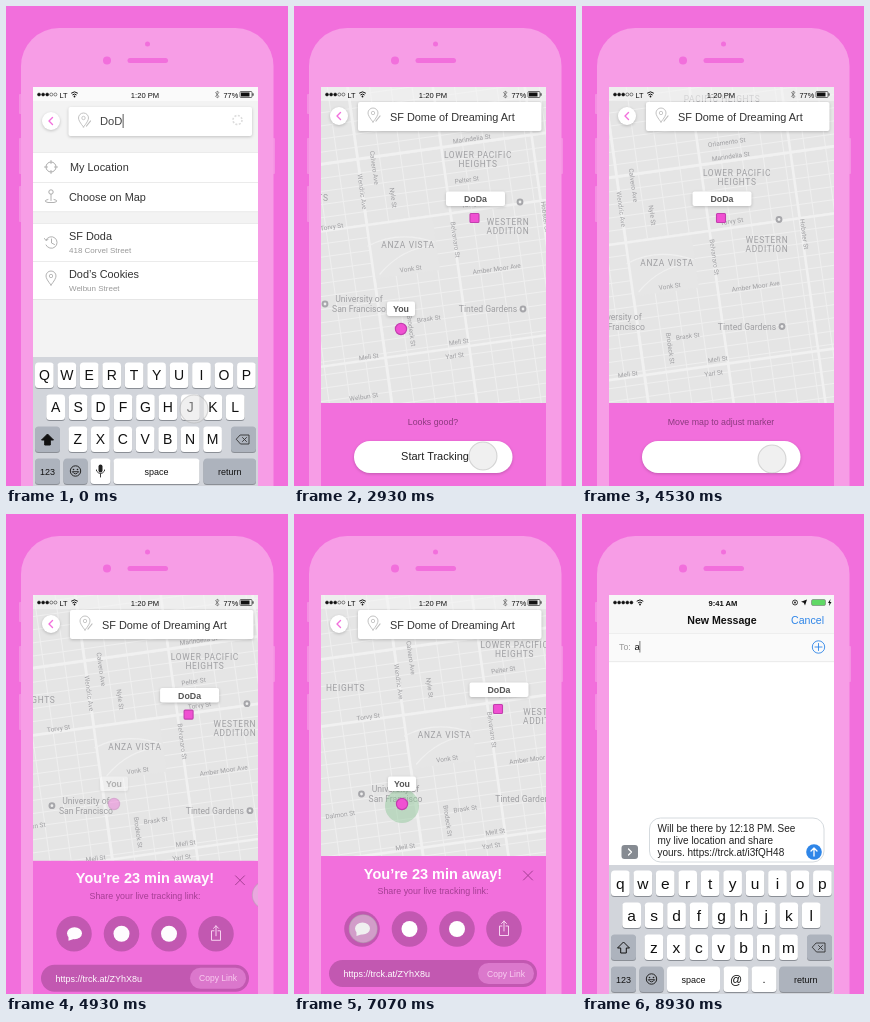
Recreate the animation shown at these times as an HTML page. Size 282 by 480 pixels, loop 9070 ms.

```html
<!DOCTYPE html>
<html lang="en">
<head>
<meta charset="utf-8">
<title>Share your trip</title>
<style>
  html, body { margin: 0; height: 100%; overflow: hidden; background: #f26fdc; }
  svg { display: block; width: 100vw; height: 100vh; }
  text { font-family: "Liberation Sans", Arial, sans-serif; white-space: pre; }
  .mid { text-anchor: middle; }
  .bold { font-weight: 700; }
  .map text { font-family: Roboto, sans-serif; text-anchor: middle; fill: #9f9fa2; }
  .line { fill: none; stroke-linecap: round; stroke-linejoin: round; }
  .card { fill: #fff; filter: drop-shadow(0 1px 1.5px rgba(0, 0, 0, .2)); }
</style>
</head>
<body>
<svg id="stage" viewBox="0 0 282 480" preserveAspectRatio="none"></svg>
<script>
const PINK = '#f26fdc', BLUE = '#2f86e8', PLACE = 'SF Dome of Dreaming Art', LOOP = 9070;

const text = (s, x, y, size, fill = '#333', attrs = '') =>
  `<text x="${x}" y="${y}" font-size="${size}" fill="${fill}" ${attrs}>${s}</text>`;
const mid = (s, x, y, size, fill, cls = '', attrs = '') => text(s, x, y, size, fill, `class="mid ${cls}" ${attrs}`);
const rect = (x, y, w, h, fill, r = 0, attrs = '') =>
  `<rect x="${x}" y="${y}" width="${w}" height="${h}" rx="${r}" fill="${fill}" ${attrs}/>`;
const dot = (x, y, r, fill, attrs = '') => `<circle cx="${x}" cy="${y}" r="${r}" fill="${fill}" ${attrs}/>`;
const line = (d, stroke, w = 1, attrs = '') => `<path class="line" d="${d}" stroke="${stroke}" stroke-width="${w}" ${attrs}/>`;
const group = (id, body, attrs = '') => `<g id="${id}" ${attrs}>${body}</g>`;

function statusBar(chat) {
  let s = '';
  for (let i = 0; i < 5; i++)
    s += dot(33 + i * 4.1, 88.5, 1.5, chat || i < 3 ? '#111' : 'none', 'stroke="#111" stroke-width=".5"');
  const wx = chat ? 58 : 68.5;
  s += line(`M${wx - 3} 87q3-2.6 6 0M${wx - 1.8} 88.7q1.8-1.6 3.6 0`, '#111', 1) + dot(wx, 90.5, .9, '#111');
  s += mid(chat ? '9:41 AM' : '1:20 PM', chat ? 141 : 139, 91.5, 7.6, '#111', chat ? 'bold' : '');
  if (chat)
    return s + dot(213, 88.5, 2.5, 'none', 'stroke="#111" stroke-width=".8"') + dot(213, 88.5, .9, '#111') +
      '<path d="M225 85.5l-2 6-1.2-2.8-2.8-1z" fill="#111"/>' +
      rect(229.5, 85.5, 14, 6, '#5fd864', 1.5, 'stroke="#777" stroke-width=".6"') +
      '<path d="M248.5 85l-2.5 4h1.5l-.5 3 2.5-4h-1.5z" fill="#111"/>';
  return s + text('LT', 53.5, 91.5, 7.4, '#111') + line('M209.5 86.5l3.5 4-2 1.5v-7l2 1.5-3.5 4', '#555', .6) +
    text('77%', 217.5, 91.5, 7.4, '#111') +
    rect(234, 85.5, 12, 6, 'none', 1, 'stroke="#111" stroke-width=".6"') +
    rect(235, 86.5, 8.5, 4, '#111') + rect(246.5, 87.3, 1, 2.4, '#111');
}

function keyboard(chat) {
  const key = (x, y, w, label, size, dark, id = '') =>
    rect(x, y + 1, w, 25.5, '#8b8f96', 3.5) +
    rect(x, y, w, 25.5, dark ? '#adb3bd' : '#fff', 3.5, id && `id="${id}"`) +
    mid(label, x + w / 2, y + 13 + size * .35, size, '#111');
  let s = rect(27, 351, 225, 129, '#d2d5db');
  [['QWERTYUIOP', 29, 356.5], ['ASDFGHJKL', 40.3, 388.5], ['ZXCVBNM', 62.5, 420.5]].forEach(([row, x, y]) => {
    [...row].forEach((c, i) => s += key(x + i * 22.45, y, 18.7, chat ? c.toLowerCase() : c,
      chat ? 15.5 : 14, 0, chat && c === 'A' ? 'keyA' : ''));
  });
  s += key(29, 420.5, 25, '', 9, 1) + key(225, 420.5, 25, '', 9, 1);
  s += `<path d="M41.5 428l6 6h-3.2v5h-5.6v-5h-3.2z" fill="${chat ? 'none' : '#111'}" stroke="#111"/>`;
  s += line('M234.5 429h8.5v9h-8.5l-4-4.5zM236.5 431.5l4 4m0-4l-4 4', '#333', .9);
  s += key(29, 452.5, 25, '123', 9, 1) + key(57.5, 452.5, 24, '', 9, 1);
  s += dot(69.5, 465, 5.2, 'none', 'stroke="#222"') + dot(67.5, 463.5, .8, '#222') + dot(71.5, 463.5, .8, '#222') +
    line('M66.5 466q3 4 6 0z', '#222', .9);
  if (chat) s += key(85, 452.5, 53, 'space', 9) + key(141.5, 452.5, 25, '@', 12) + key(169.5, 452.5, 25, '.', 11);
  else s += key(84.5, 452.5, 20, '', 9) + rect(92.5, 458.5, 4, 8, '#222', 2) +
    line('M90.5 464v1q4 5 8 0v-1M94.5 468v3', '#222', .9) + key(107.5, 452.5, 86, 'space', 9);
  return s + key(197.5, 452.5, 52.5, 'return', 9, 1);
}

const pin = (x, y, c = '#aaa') =>
  line(`M${x} ${y + 7}q-5-6-5-9a5 5 0 0 1 10 0q0 3-5 9z`, c, .9) + dot(x, y - 2, 1.7, 'none', `stroke="${c}" stroke-width=".8"`);

const searchBar = (x, y, label) =>
  dot(45, y + 14, 9, '#fff', 'class="card"') + line(`M46.5 ${y + 10.5}l-3.5 3.5 3.5 3.5`, PINK, 1.4) +
  rect(x, y, 183.5, 29, '#fff', 2, 'class="card"') + pin(x + 15, y + 13, '#bbb') +
  line(`M${x + 18} ${y + 19}l4-5`, '#bbb', 1.2) + label;

function searchScreen() {
  const rule = y => rect(27, y, 225, .6, '#dedede');
  return rect(27, 81, 225, 399, '#f3f3f3') + rect(27, 81, 225, 14, '#fafafa') + statusBar() +
    searchBar(62.5, 101, text('DoD', 94, 119, 11.2, '#444') + rect(116.7, 108, .8, 14, '#333')) +
    group('spinner', dot(231.5, 114, 4.5, 'none', 'stroke="#ddd" stroke-width="1.6" stroke-dasharray="2 1.5"')) +
    rect(27, 146, 225, 60, '#fff') + rect(27, 217, 225, 76, '#fff') +
    rect(27, 217, 225, 38, '#ececec', 0, 'id="rowTap"') +
    [146, 176, 205.5, 217, 255, 293].map(rule).join('') +
    dot(45, 161, 5, 'none', 'stroke="#aaa"') + line('M45 154.5v3m0 7v3m-6.5-6.5h3m7 0h3', '#aaa', .9) +
    dot(45, 186, 2.2, 'none', 'stroke="#aaa"') + line('M45 188.5v6m-3-1q-6 1.5 0 3h6q6-1.5 0-3', '#aaa', .9) +
    line('M40 234a5.8 5.8 0 1 1 0 5m-1.5-6.5l1.5 2 2-1M45.5 233v4l3 1.5', '#aaa', .9) + pin(45, 272) +
    text('My Location', 64, 164.5, 10.9) + text('Choose on Map', 63, 194.5, 10.9) +
    text('SF Doda', 63, 234, 10.9) + text('418 Corvel Street', 63, 246.5, 8, '#999') +
    text('Dod’s Cookies', 63, 271.5, 10.9) + text('Welbun Street', 63, 284.5, 8, '#999') + keyboard();
}

// Each label: words, x, y, tilt in degrees
const areas = [['PACIFIC HEIGHTS', 169, 78.5], ['LOWER PACIFIC', 184, 152], ['HEIGHTS', 184, 161], ['ANZA VISTA', 114, 242],
  ['WESTERN', 214, 219], ['ADDITION', 214, 228], ['HEIGHTS', 15, 195]];
const places = [['University of', 65, 296], ['San Francisco', 65, 306], ['Tinted Gardens', 194, 306]];
const streets = [['Orlamento St', 174, 121], ['Marindelia St', 178, 135], ['Pelter St', 173, 176], ['Torvy St', 38, 223],
  ['Torvy St', 179, 200], ['Vonk St', 117, 265], ['Amber Moor Ave', 203, 265], ['Brask St', 135, 315], ['Dalmon St', 10, 321],
  ['Mell St', 75, 353], ['Mell St', 165, 338], ['Yarl St', 161, 352], ['Welbun St', 70, 393],
  ['Belvanaro St', 159, 234, 82], ['Wendric Ave', 66, 186, 82], ['Calvero Ave', 78, 162, 82], ['Nyle St', 97, 192, 82],
  ['Hobster St', 249, 211, 82], ['Brodeck St', 115, 325, 82]];

function cityMap() {
  const tilt = (s, x, y, a = -8) => text(s, x, y, 6.5, '', `transform="rotate(${a} ${x} ${y})"`);
  const major = (x, y) => `M${x - 300} ${y + 42}l600-84`;
  const cross = (x, y) => `M${x - 42} ${y - 300}l84 600`;
  return rect(-80, 20, 450, 470, 'url(#blocks)') +
    '<path d="M72 218l66-9 8 55-66 9z" fill="#e6e6e6"/>' +
    line(major(38, 224) + major(75, 354) + major(178, 137) + cross(160, 232) + cross(68, 185) + cross(249, 211), '#f1f1f1', 2.6) +
    line('M74 240q30-16 66-4M86 268q22-26 52-28', '#f0f0f0', 1.2) +
    streets.map(s => tilt(...s)).join('') +
    areas.map(([s, x, y]) => text(s, x, y, 8.4, '', 'letter-spacing=".65"')).join('') +
    places.map(([s, x, y]) => text(s, x, y, 8.6)).join('') +
    [[226, 196], [229, 303], [31, 298]].map(([x, y]) => dot(x, y, 3.4, '#a6a6aa') + dot(x, y, 1.4, '#eee')).join('');
}

const tag = (s, w) => rect(-w / 2, -7.5, w, 14.5, '#fff', 2, 'class="card"') + mid(s, 0, 3.2, 8.8, '#555', 'bold');

function sharePanel() {
  const disk = [68, 115.5, 163, 210].map(x => dot(x, 415, 17.8, '#c258b1')).join('');
  const dark = '#a43f93';
  return mid('You’re 23 min away!', 139, 364.5, 14.5, '#fff', 'bold') +
    mid('Share your live tracking link:', 139, 380, 8.9, dark) + line('M229.5 357l9 9m0-9l-9 9', dark) + disk +
    '<ellipse cx="68.5" cy="414.5" rx="7.5" ry="6" fill="#fff"/><path d="M62.5 416l0 6 6-2z" fill="#fff"/>' +
    dot(115.5, 415, 8, '#fff') + dot(163, 415, 8, '#fff') +
    line('M208 412h-2.5v9.5h9v-9.500h-2.5M210 417v-10m-2.5 2.500l2.5-2.500 2.5 2.500', '#f8d3f1', 1) +
    rect(35, 446, 208, 27, '#c258b1', 13.5) + text('https://trck.at/ZYhX8u', 49.5, 463, 9, '#fff') +
    rect(184, 449, 56, 21, '#db78cc', 10.5) + mid('Copy Link', 212, 462.5, 8.5, '#f9cdf1');
}

const mapScreen = () =>
  group('city', cityMap(), 'class="map"') +
  group('you', dot(0, 2, 16, '#8fc79a', 'id="pulse"') +
    group('youDot', dot(0, 0, 5.6, '#f050d2', 'stroke="#c23fae" stroke-width="1.2"')) +
    `<g transform="translate(0 -20)">${tag('You', 28)}</g>`) +
  group('goal', rect(-4.5, -4.5, 9, 9, '#f050d2', 1, 'stroke="#c23fae" stroke-width="1.1"') +
    `<g transform="translate(1 -19)">${tag('DoDa', 59)}</g>`) +
  rect(27, 81, 225, 14, '#f6f6f6', 0, 'opacity=".6"') + statusBar() +
  searchBar(64, 96, text(PLACE, 96, 115, 10.9)) +
  rect(27, 397, 225, 140, PINK, 0, 'id="sheet"') +
  group('ask', mid('Looks good?', 139, 419, 8.8, '#8c3a7f', '', 'id="askStart"') +
    mid('Move map to adjust marker', 139, 419, 8.8, '#8c3a7f', '', 'id="askMove"') +
    rect(60, 435, 158.5, 32, '#fff', 16, 'class="card"') + mid('Start Tracking', 141, 454, 11, '#222', '', 'id="go"')) +
  group('share', sharePanel());

const chatScreen = () =>
  rect(27, 81, 225, 399, '#fff') + rect(27, 81, 225, 38, '#f7f7f7') + rect(27, 119, 225, .6, '#d4d4d6') +
  rect(27, 119.6, 225, 28, '#fafafa') + rect(27, 147.5, 225, .6, '#ddd') + statusBar(true) +
  mid('New Message', 140, 110, 10.6, '#111', 'bold') + text('Cancel', 242, 110, 10.6, BLUE, 'text-anchor="end"') +
  text('To:', 37, 136, 8.8, '#999') + text('a', 52.5, 136, 9.5, '#111', 'id="typed"') +
  rect(52, 127, .8, 11.5, '#555', 0, 'id="caret"') +
  dot(236.5, 133, 6.2, 'none', `stroke="${BLUE}" stroke-width=".9"`) + line('M236.5 129.5v7m-3.5-3.5h7', BLUE, .9) +
  rect(67.5, 304, 174.5, 44, '#fff', 11, 'stroke="#d5dade"') +
  ['Will be there by 12:18 PM. See', 'my live location and share', 'yours. https://trck.at/i3fQH48']
    .map((s, i) => text(s, 75.5, 317.8 + i * 12, 10, '#222')).join('') +
  dot(232, 338, 7.8, BLUE) + line('M232 342v-8m-3 3l3-3 3 3', '#fff', 1.3) +
  rect(39.5, 331, 16.5, 14, '#868b92', 3) + line('M46.5 335l3 3-3 3', '#fff', 1.2) + keyboard(true);

stage.innerHTML = `<defs>
  <clipPath id="screen"><rect x="27" y="81" width="225" height="399"/></clipPath>
  <pattern id="blocks" width="21" height="13" patternUnits="userSpaceOnUse" patternTransform="translate(160 232) rotate(-8)">
    ${rect(0, 0, 21, 13, '#e5e5e5')}${line('M0 0H21M0 0V13', '#efefef', 2)}</pattern>
</defs>` + rect(0, 0, 282, 480, PINK) +
  [[13, 88, 20], [13, 132, 36], [13, 180, 36], [266, 132, 36]].map(([x, y, h]) => rect(x, y, 3, h, '#f48fe2', 1)).join('') +
  rect(15, 22, 252.5, 520, '#f79de6', 38) +
  dot(141.5, 38, 2.5, PINK) + dot(101, 54.5, 4, PINK) + rect(121.5, 52, 40.5, 5, PINK, 2.5) +
  `<g clip-path="url(#screen)">${group('map', mapScreen())}${group('search', searchScreen())}${group('chat', chatScreen())}` +
  group('touch', dot(0, 0, 14, '#e2e2e2', 'fill-opacity=".5" stroke="#aaa" stroke-opacity=".45" stroke-width="1.1"')) + '</g>';

const $ = id => document.getElementById(id);
const ease = (t, a, b) => { const p = Math.min(1, Math.max(0, (t - a) / (b - a))); return p * p * (3 - 2 * p); };

// Eased value of each column between rows of [time, ...values]
function along(t, keys) {
  let i = 0;
  while (i < keys.length - 2 && t >= keys[i + 1][0]) i++;
  const [a, b] = [keys[i], keys[i + 1]], p = ease(t, a[0], b[0]);
  return a.slice(1).map((v, n) => v + (b[n + 1] - v) * p);
}
const move = (id, [x, y]) => $(id).setAttribute('transform', `translate(${x} ${y})`);
const alpha = (id, v) => $(id).setAttribute('opacity', v);

const cityPath = [[1270, 8, 4], [1450, 2, 1], [2130, 0, 0], [3400, 0, 0], [3750, -41, 0], [3850, -41, 0],
  [4150, -29, 17.5], [4580, -29, 17.5], [5150, 36.5, -18]];
const goalPath = [[3400, 180.5, 212], [3750, 139, 212], [4580, 139, 212], [5150, 204, 195]];
const youPath = [[1300, 6, 8], [1500, 6, 8], [1900, 0, 0]];
const touchPath = [[0, 188, 403], [700, 195, 245], [2200, 195, 245], [2850, 189, 450], [3550, 189, 450], [3820, 160, 242],
  [3850, 160, 242], [4150, 172, 259], [4420, 190, 453], [4600, 190, 453], [5050, 275, 366], [6450, 275, 366], [7100, 68, 415]];

function draw(t) {
  $('spinner').setAttribute('transform', `rotate(${Math.min(t, 1130) * .36} 231.5 114)`);
  alpha('rowTap', ease(t, 900, 1100));
  alpha('search', 1 - ease(t, 1250, 1420));

  move('city', along(t, cityPath));
  move('goal', along(t, goalPath));

  const enRoute = t > 4500;
  move('you', enRoute ? [108, 290] : [107, 323]);
  alpha('you', enRoute ? ease(t, 4850, 5050) : ease(t, 1270, 1400) * (1 - ease(t, 3400, 3550)));
  move('youDot', along(t, youPath));
  const age = enRoute ? Math.max(0, t - 4950) % 1450 : t - 1270;
  $('pulse').setAttribute('r', 17 * ease(age, 0, 220));
  alpha('pulse', .9 * Math.max(0, 1 - age / 1450));

  const up = ease(t, 4620, 5000), asked = ease(t, 3400, 3600);
  move('sheet', [0, -55 * up]);
  move('ask', [0, -55 * up]);
  move('share', [0, 55 * (1 - up)]);
  alpha('ask', 1 - ease(t, 4620, 4780));
  alpha('share', ease(t, 4700, 4950));
  alpha('askStart', 1 - asked);
  alpha('askMove', asked);
  alpha('go', 1 - ease(t, 4400, 4510));

  move('chat', [0, 400 * (1 - ease(t, 7230, 7600))]);
  const typed = t >= 8670;
  alpha('typed', typed ? 1 : 0);
  $('caret').setAttribute('x', typed ? 57.5 : 52);
  $('keyA').setAttribute('fill', typed && t < 8870 ? '#c9ccd2' : '#fff');

  move('touch', along(t, touchPath));
  alpha('touch', 1 - ease(t, 7200, 7350));
}

function tick() {
  draw(performance.now() % LOOP);
  requestAnimationFrame(tick);
}
tick();
</script>
</body>
</html>
```
